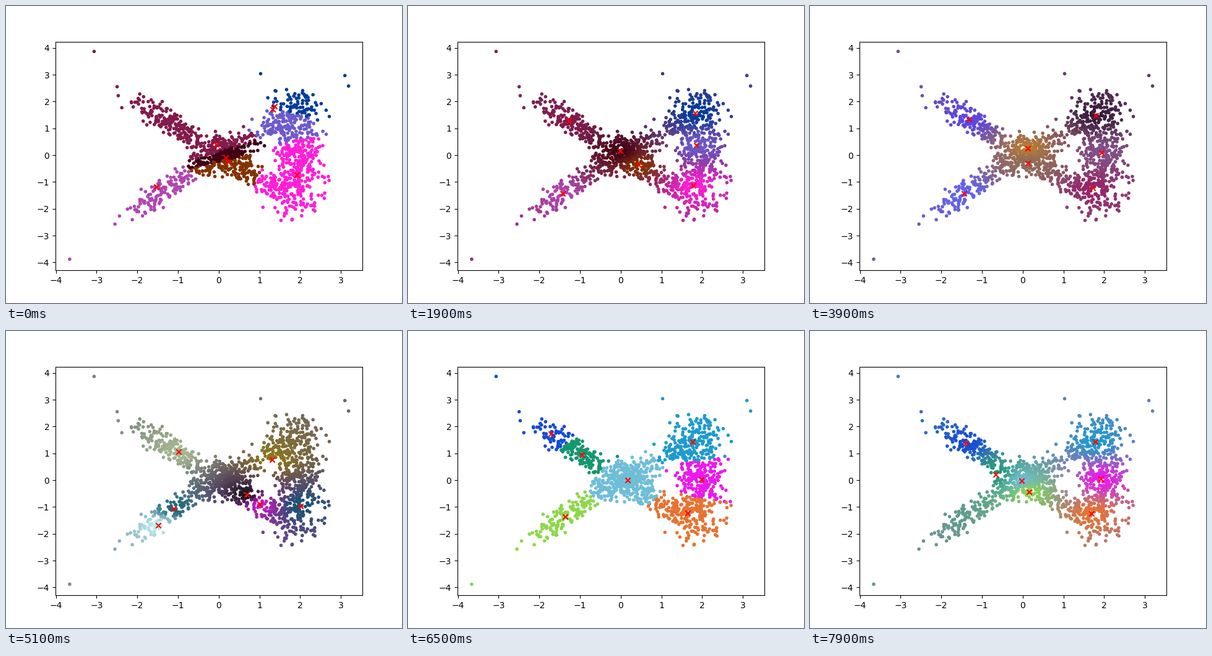
A matplotlib script for the animation above (8000 ms loop, 640x480 px).

```python
import numpy as np
import matplotlib.pyplot as plt
from matplotlib.animation import FuncAnimation
from matplotlib.colors import to_rgb

STEPS = 10  # iterations shown per clustering run
rng = np.random.default_rng(11)


def noise(n):
    """Normal pairs without far outliers."""
    z = rng.normal(size=(3 * n, 2))
    return z[np.hypot(*z.T) < 2.6][:n]


def blob(n, centre, spread):
    return np.array(centre) + noise(n) * spread


def arm(n, direction, width):
    t = 1.05 + 0.6 * noise(3 * n)[:, :1]
    t = t[(t > 0.2) & (t < 2.6)][:n, None]
    return t * direction + noise(n) * width


def bridge(n, start, end, width):
    t = rng.random((n, 1))
    return np.array(start) * (1 - t) + np.array(end) * t + noise(n) * width


points = rng.permutation(np.vstack([
    [(-3.06, 3.87), (-3.66, -3.88), (3.19, 2.58), (3.10, 2.97), (1.03, 3.04)],
    arm(190, (-1, 1), (0.18, 0.2)),
    arm(165, (-1, -1), (0.19, 0.22)),
    blob(360, (0.1, 0.02), (0.34, 0.36)),
    bridge(75, (0.4, 0.4), (1.45, 1.2), (0.15, 0.22)),
    bridge(95, (0.4, -0.4), (1.4, -1.2), (0.15, 0.23)),
    blob(195, (1.88, 1.4), (0.35, 0.48)),
    blob(190, (1.98, 0.1), (0.28, 0.42)),
    blob(205, (1.83, -1.2), (0.37, 0.55)),
]))

# Colour and starting centre of every cluster, one block per run
runs = [
    {"#821a4b": (-0.05, 0.40), "#003c9b": (1.37, 1.82), "#6c5acd": (1.32, 1.70),
     "#ff1ed7": (1.92, -0.73), "#823200": (0.23, -0.25),
     "#410014": (0.17, -0.08), "#af46af": (-1.53, -1.17)},
    {"#5a46e6": (-1.10, 1.10), "#5f64f5": (-0.75, -0.70), "#b97d32": (0.30, 0.50),
     "#8c6c5a": (0.20, -0.40), "#37193c": (1.70, 1.60),
     "#82508c": (2.05, 0.20), "#962369": (1.60, -1.10)},
    {"#8c7819": (1.31, 0.76), "#0f1412": (0.69, -0.54), "#d719d7": (1.00, -0.90),
     "#145573": (2.01, -0.96), "#a5b991": (-0.98, 1.06),
     "#196478": (-1.10, -1.05), "#c3f0f5": (-1.48, -1.69)},
    {"#144bd7": (-1.17, 1.38), "#14966e": (-1.39, 1.07), "#6ebed7": (-0.51, 0.42),
     "#8cd74b": (0.12, -0.46), "#1e9bcd": (1.99, 0.97),
     "#eb19eb": (1.44, -0.05), "#e67332": (1.72, -1.36)},
]


def dist2(centres):
    return ((points[:, None] - centres) ** 2).sum(axis=2) + 1e-9


def hard(centres):
    """K-means: each point belongs to its nearest centre only."""
    return np.eye(len(centres))[dist2(centres).argmin(axis=1)]


def fuzzy(centres):
    """Fuzzy c-means: membership falls with squared distance."""
    w = 1 / dist2(centres)
    return w / w.sum(axis=1, keepdims=True)


def advance(centres, membership):
    w = membership(centres) ** 2
    total = w.sum(axis=0)[:, None]
    return np.where(total > 0, w.T @ points / np.maximum(total, 1e-9), centres)


def iterate(centres, palette, membership):
    for _ in range(STEPS):
        yield centres, np.clip(membership(centres) @ palette, 0, 1)
        centres = advance(centres, membership)


def simulate(run):
    palette = np.array([to_rgb(c) for c in run])
    start = np.array(list(run.values()))
    yield from iterate(start, palette, hard)
    # The fuzzy pass opens one mirrored step before the starting centres.
    before = 2 * start - advance(start, fuzzy)
    states = list(iterate(start, palette, fuzzy))
    yield before, np.clip(fuzzy(before) @ palette, 0, 1)
    yield from states[:-1]


states = [state for run in runs for state in simulate(run)]

fig, ax = plt.subplots(figsize=(6.4, 4.8), dpi=100)
ax.set_xlim(-4.008, 3.53)
ax.set_ylim(-4.295, 4.235)
dots = ax.scatter(*points.T, marker=".", s=36, linewidths=1)
marks = ax.scatter(*states[0][0].T, marker="x", s=36, c="red", linewidths=1.5)


def update(i):
    centres, colours = states[i]
    dots.set_facecolor(colours)
    dots.set_edgecolor(colours)
    marks.set_offsets(centres)
    return dots, marks


anim = FuncAnimation(fig, update, frames=len(states), interval=100,
                     repeat=True, repeat_delay=0)
plt.show()
```
